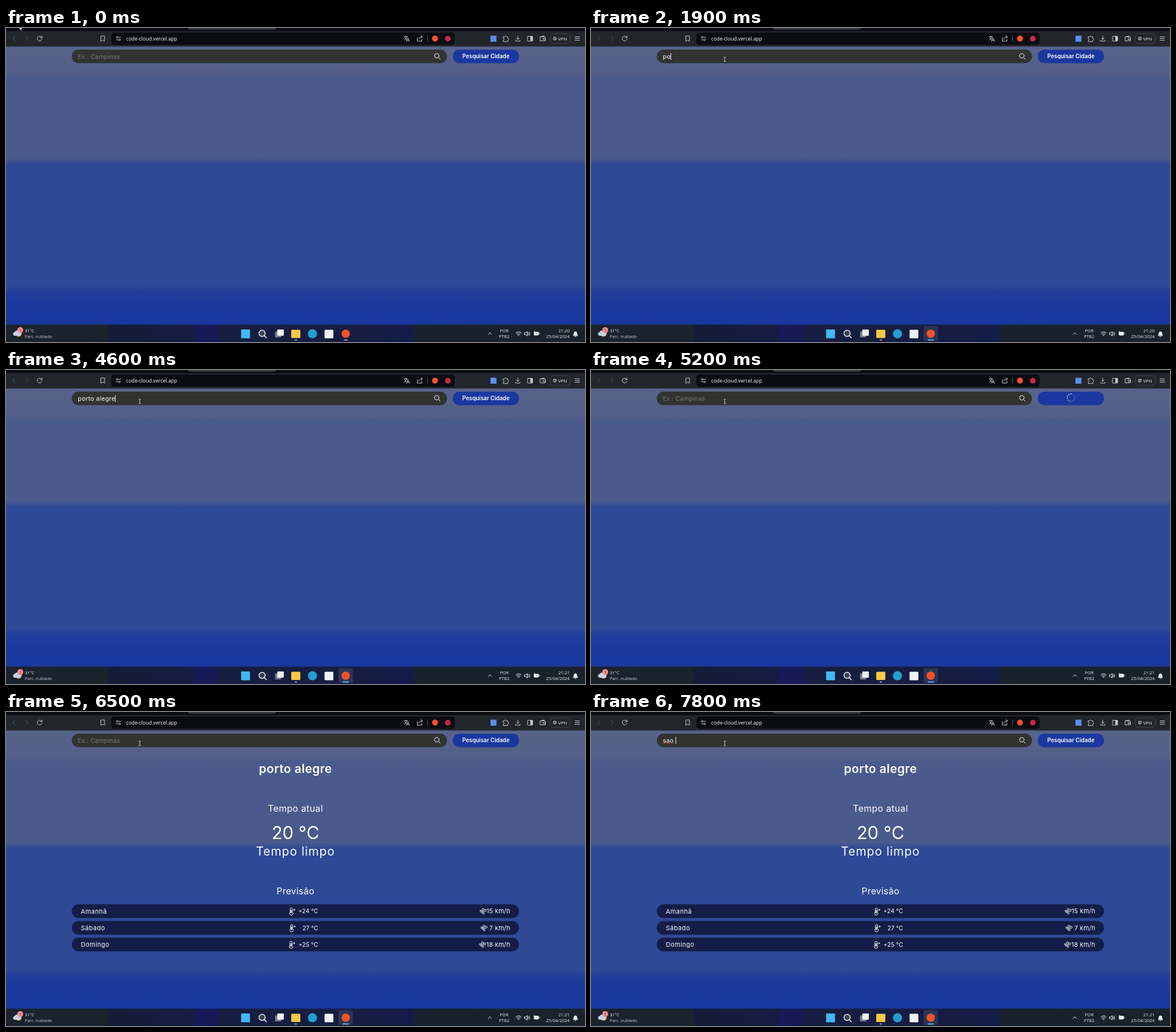
Animation, 1017 px wide and 551 px high, one loop 8000 ms. Source, as an HTML page:

```html
<!DOCTYPE html>
<html lang="pt-BR">
<head>
<meta charset="utf-8">
<title>Previsão do tempo</title>
<style>
html, body { margin: 0; width: 100%; height: 100%; overflow: hidden; background: #1a389f; }
svg { display: block; width: 100vw; height: 100vh; }
text { white-space: pre; font-family: Inter, sans-serif; fill: #fff; }
.ui text { font-family: "Open Sans", "Noto Sans", sans-serif; font-size: 7.6px; fill: #eceef0; }
.mid { text-anchor: middle; }
.end { text-anchor: end; }
.line { fill: none; stroke: #c9ccd1; stroke-width: 1; stroke-linecap: round; stroke-linejoin: round; }
.dim { stroke: #565a61; }
.field { font-size: 10.7px; letter-spacing: .34px; }
#hint { fill: #777872; letter-spacing: .2px; }
.row text { font-size: 11px; }
</style>
</head>
<body>
<svg viewBox="0 0 1017 551" preserveAspectRatio="none">
  <defs>
    <linearGradient id="sky" gradientUnits="userSpaceOnUse" x1="0" y1="32" x2="0" y2="521">
      <stop offset="0" stop-color="#58638a"/>
      <stop offset=".098" stop-color="#545f89"/>
      <stop offset=".115" stop-color="#4a5a8b"/>
      <stop offset=".402" stop-color="#4a5a8c"/>
      <stop offset=".425" stop-color="#2e4996"/>
      <stop offset=".86" stop-color="#2e4996"/>
      <stop offset=".883" stop-color="#213e9b"/>
      <stop offset=".925" stop-color="#1b399d"/>
      <stop offset="1" stop-color="#19389f"/>
    </linearGradient>
    <linearGradient id="bar" gradientUnits="userSpaceOnUse" x1="0" y1="0" x2="1017" y2="0">
      <stop offset="0" stop-color="#1b232d"/>
      <stop offset=".175" stop-color="#1a222d"/>
      <stop offset=".179" stop-color="#141c37"/>
      <stop offset=".322" stop-color="#151c44"/>
      <stop offset=".327" stop-color="#151a58"/>
      <stop offset=".363" stop-color="#151a56"/>
      <stop offset=".369" stop-color="#151d40"/>
      <stop offset=".6" stop-color="#151d42"/>
      <stop offset=".7" stop-color="#131c48"/>
      <stop offset=".71" stop-color="#18212c"/>
      <stop offset="1" stop-color="#1a222b"/>
    </linearGradient>
    <g id="thermo" class="line" style="stroke:#fff">
      <path d="M-2.3 1.6v-5.4a1.9 1.9 0 0 1 3.8 0v5.4a3 3 0 1 1-3.8 0z"/>
      <path d="M-.4-1.5v5" stroke-width="1.6"/>
      <circle cx="4.8" cy="-2.4" r="1.1"/>
    </g>
    <g id="wind" class="line" style="stroke:#fff" stroke-width="1.2">
      <path d="M-5.5-1.3h5.3a1.7 1.7 0 1 0-1.7-1.7M-5.5.6h9.3a1.8 1.8 0 1 0-1.8-1.8M-3.5 2.4h4a1.4 1.4 0 1 1-1.4 1.4"/>
    </g>
  </defs>

  <rect y="32" width="1017" height="490" fill="url(#sky)"/>

  <g class="ui">
    <rect width="1017" height="32.5" fill="#22262b"/>
    <rect width="1017" height="5.5" fill="#0c0d12"/>
    <rect x="319.500" y="-6" width="155" height="9" rx="4" fill="#363940"/>
    <rect x="185" y="8" width="603" height="21.500" rx="5" fill="#0b0c11"/>
    <path class="line dim" d="M16 14.500l-4 4 4 4M35 14.500l4 4-4 4"/>
    <path class="line" d="M62.800 16.500a4.200 4.200 0 1 0 .4 3M63.300 14v3h-3"/>
    <path class="line" d="M167 14h6v9.300l-3-2.300-3 2.300z"/>
    <g class="line">
      <circle cx="195.300" cy="16.300" r="1.500"/><path d="M198.300 16.300h3"/>
      <circle cx="199.300" cy="20.800" r="1.500"/><path d="M193.500 20.800h3"/>
    </g>
    <text x="211" y="21.800" style="font-size:8.800px;fill:#fff">code-cloud.vercel.app</text>
    <path class="line" d="M699.500 15.500h6M702.500 14v1.500M704.500 15.500q-1 4-5 5.800M700.500 17q1.500 3 4 4M703.500 23.500l2.600-6 2.600 6M704.400 21.700h3.400"/>
    <path class="line" d="M722.500 17v6h8v-3M725 20q.3-4.500 6-4.500M729 13l2.600 2.500-2.600 2.500"/>
    <path d="M740.500 13v11" stroke="#4b4e56"/>
    <circle cx="753.500" cy="18.500" r="5.200" fill="#f4512c"/>
    <circle cx="776" cy="18.800" r="5" fill="#c5284f"/>
    <rect x="851" y="13.500" width="10.500" height="10.500" fill="#5b8def"/>
    <path class="line" d="M873.500 15.500h2.500a1.500 1.500 0 1 1 3 0h2.500v2.500a1.500 1.500 0 1 1 0 3v2.800h-8v-2.800a1.500 1.500 0 1 0 0-3z"/>
    <path class="line" d="M899 14v6M896.500 17.800l2.500 2.500 2.500-2.500M895 21.500v1.500h8v-1.500"/>
    <rect class="line" x="916" y="14.500" width="9" height="8.500" rx="1"/>
    <rect x="921" y="15" width="4" height="7.500" fill="#c9ccd1"/>
    <path class="line" d="M938.500 15.500h8a1 1 0 0 1 1 1v6h-9zM938.500 15.500l7-1.500M944 18h3.500v2.500h-3.500z"/>
    <rect x="956" y="10" width="35" height="17" rx="5" fill="none" stroke="#464a51"/>
    <circle cx="964" cy="18.500" r="3.200" fill="#8d929b"/><path d="M962.500 18.500h3" stroke="#2b2e34"/>
    <text x="970" y="21.500" style="font-size:8px">VPN</text>
    <path class="line" d="M999.500 15.500h8M999.500 18.500h8M999.500 21.500h8"/>
  </g>

  <rect x="115.500" y="38" width="659" height="23.700" rx="11.800" fill="#323331"/>
  <text id="hint" class="field" x="126" y="53.500">Ex.: Campinas</text>
  <text id="typed" class="field" x="126.300" y="53.500"></text>
  <path id="typo" d="M126 55.300h19" stroke="#d8453c" stroke-width=".9" stroke-dasharray="1.200 .6"/>
  <rect id="caret" y="44" width="1" height="12" fill="#fff"/>
  <g class="line" style="stroke:#fff" stroke-width="1.400"><circle cx="756.700" cy="48.700" r="4"/><path d="M759.700 51.700l3 3"/></g>
  <rect x="785" y="38" width="116" height="23.700" rx="10.500" fill="#1a389f"/>
  <text id="label" class="mid" x="843" y="53.300" style="font-size:9.800px;font-weight:600">Pesquisar Cidade</text>
  <g id="spinner" fill="#d9e0d8"></g>

  <g id="report">
    <text class="mid" x="508.500" y="106.500" style="font-size:21px;font-weight:600;letter-spacing:.43px">porto alegre</text>
    <text class="mid" x="508.500" y="175" style="font-size:15.800px;letter-spacing:.48px">Tempo atual</text>
    <text class="mid" x="508.500" y="223" style="font-size:31px">20 °C</text>
    <text class="mid" x="508.500" y="251.700" style="font-size:21px;letter-spacing:1px">Tempo limpo</text>
    <text class="mid" x="508.500" y="320" style="font-size:15.800px;letter-spacing:.28px">Previsão</text>
  </g>

  <g class="ui">
    <rect y="520.500" width="1017" height="31" fill="url(#bar)"/>
    <circle cx="22" cy="536" r="5.500" fill="#f2b457"/>
    <path d="M15 540a3.300 3.300 0 0 1 .3-6.500 4.500 4.500 0 0 1 8.500 1 2.800 2.800 0 0 1 .7 5.500z" fill="#c3d3ea"/>
    <circle cx="25" cy="530" r="5.200" fill="#f58e93"/>
    <text class="mid" x="25" y="532.600" style="font-size:7px;fill:#2a1a1e">1</text>
    <text x="33" y="533.600">31°C</text>
    <text x="33" y="544" style="font-size:7.500px;fill:#c9cdd2">Parc. nublado</text>

    <rect id="active" x="584" y="523" width="25.500" height="26" rx="3" fill="#fff" fill-opacity=".1"/>
    <rect x="413" y="529" width="15.500" height="15.500" fill="#43b8f2"/>
    <circle cx="449.800" cy="535.800" r="5.400" fill="#39414f" stroke="#eef0f3" stroke-width="1.500"/>
    <path d="M453.800 540l3.500 3.500" stroke="#eef0f3" stroke-width="1.700" stroke-linecap="round"/>
    <rect x="472.500" y="532.500" width="11" height="10.500" rx="1" fill="#767b86"/>
    <rect x="476.500" y="529" width="11.500" height="11" rx="1" fill="#eceef1"/>
    <rect x="501" y="529.500" width="16" height="14.500" rx="1.500" fill="#f9c846"/>
    <circle cx="538.300" cy="536.600" r="8" fill="#239fcf"/>
    <rect x="559.500" y="529.500" width="15.500" height="15" rx="1.500" fill="#eef2f6"/>
    <circle cx="596.700" cy="536.500" r="7.300" fill="#f4512c"/>
    <rect x="506.800" y="546.500" width="4.500" height="2" rx="1" fill="#9ca1a8"/>
    <rect id="mark" y="546.500" height="2" rx="1"/>

    <path class="line" d="M846.800 537.800l3-3 3 3" style="stroke:#eceef0"/>
    <text class="mid" x="875" y="533.600">POR</text>
    <text class="mid" x="875" y="544">PTB2</text>
    <g class="line" style="stroke:#eceef0">
      <path d="M895.500 535a6.500 6.500 0 0 1 9.500 0M897 537a4.500 4.500 0 0 1 6.500 0M898.600 538.800a2.500 2.500 0 0 1 3.300 0M900.200 540.300v.1"/>
      <path d="M911 535h1.800l2.700-2.500v8l-2.700-2.500h-1.800zM917.300 534.800q1.300 1.700 0 3.400M919 533.300q2.300 3.200 0 6.400"/>
      <rect x="927.500" y="533.500" width="8" height="5.500" rx="1" fill="#eceef0"/><path d="M937.300 535.500v1.500M928 532v3"/>
      <path d="M996.500 539.500q1.200-1.500 1.200-4a2.500 2.500 0 0 1 5 0q0 2.500 1.200 4zM999 541.300h2.300" fill="#eceef0"/>
    </g>
    <text id="clock" class="end" x="990" y="533.600" style="font-size:7.800px"></text>
    <text class="end" x="990" y="544" style="font-size:7.800px">25/04/2024</text>
  </g>

  <path id="arrow" d="M0 0v7.200l1.700-1.500 1.100 2.500 1.200-.5-1.100-2.500h2.300z" fill="#fff" stroke="#111" stroke-width=".4"/>
  <path id="beam" d="M-1.800-3.800h1.300l.5.500.5-.5h1.300M0-3.300v6.900M-1.800 4h1.300l.5-.5.5.5h1.300" fill="none" stroke="#e4e5e2" stroke-width=".9"/>
</svg>
<script>
const LOOP = 8000, NS = 'http://www.w3.org/2000/svg';
const $ = id => document.getElementById(id);
const show = (id, on) => $(id).style.visibility = on ? 'visible' : 'hidden';
const ramp = (t, a, b) => Math.min(1, Math.max(0, (t - a) / (b - a)));
const last = (list, t) => list.filter(k => k[0] <= t).pop();

function add(parent, tag, attrs, text) {
  const el = parent.appendChild(document.createElementNS(NS, tag));
  for (const k in attrs) el.setAttribute(k, attrs[k]);
  if (text) el.textContent = text;
  return el;
}

// Forecast rows: day, temperature, wind, wind icon x, thermometer x
[['Amanhã', '+24 °C', '15 km/h', 838, 501.5],
 ['Sábado', '27 °C', '7 km/h', 839.5, 502],
 ['Domingo', '+25 °C', '18 km/h', 837, 501]].forEach(([day, temp, wind, wx, tx], i) => {
  const y = 337.5 + i * 29.3, mid = y + 12;
  const g = add($('report'), 'g', { class: 'row' });
  add(g, 'rect', { x: 115.5, y, width: 785.5, height: 24, rx: 12, fill: '#131d47' });
  add(g, 'text', { x: 131.5, y: mid + 4, style: 'letter-spacing:.5px' }, day);
  add(g, 'use', { href: '#thermo', x: tx, y: mid });
  add(g, 'text', { class: 'end', x: 548, y: mid + 3.7, style: 'font-size:10.4px' }, temp);
  add(g, 'use', { href: '#wind', x: wx, y: mid });
  add(g, 'text', { class: 'end', x: 885.7, y: mid + 3.7, style: 'letter-spacing:.2px' }, wind);
});

const DOTS = 11;
const dots = Array.from({ length: DOTS }, (_, i) => {
  const a = i / DOTS * 2 * Math.PI;
  return add($('spinner'), 'circle', { cx: 843 + 6.5 * Math.sin(a), cy: 48.5 - 6.5 * Math.cos(a), r: 1.1 });
});

// Key press times for each word
const words = [
  ['porto alegre', [1600, 1900, 2200, 2600, 2700, 2900, 3100, 3600, 3800, 4200, 4400, 4600], 5000],
  ['sao ', [7100, 7300, 7500, 7800], LOOP]
];
const pointer = [[0, 24, -3.5], [100, 62, 9], [200, 138, 34], [300, 208, 57],
  [400, 235, 63], [600, 236, 57], [700, 235, 55]];

// The second word's space has its own key press
const typedAt = t => words.map(([word, keys, end]) =>
  t < end ? word.slice(0, keys.filter(k => k <= t).length) : '').join('');

words[0][1].splice(5, 1, 2900);

function draw(t) {
  t = Math.floor(t / 100) * 100;
  const text = typedAt(t);
  if ($('typed').textContent !== text) $('typed').textContent = text;
  show('hint', !text);
  show('typo', t >= 7800);
  show('caret', t >= 1000 && t < 5000 || t >= 5600 && t < 6500 || t >= 7100);
  $('caret').setAttribute('x', 126 + (text ? $('typed').getComputedTextLength() : 0));

  const busy = t >= 5000 && t < 5300;
  show('label', !busy);
  show('spinner', busy);
  const head = (t - 5000) / 100 + DOTS - 2;
  dots.forEach((d, i) => d.setAttribute('opacity', 1 - .08 * ((head - i + 2 * DOTS) % DOTS)));
  show('report', t >= 5300);

  const focus = ramp(t, 900, 1400);
  const w = t < 1000 ? 7 - 2.5 * ramp(t, 0, 400) : 4.5 + 6.5 * focus;
  $('active').setAttribute('opacity', focus);
  $('mark').setAttribute('x', 596.7 - w / 2);
  $('mark').setAttribute('width', w);
  $('mark').setAttribute('fill', t < 1000 ? '#9ca1a8' : '#5cb9f0');
  $('clock').textContent = t < 3100 ? '21:20' : '21:21';

  const [, x, y] = last(pointer, t);
  const inField = t >= 600;
  show('arrow', !inField);
  show('beam', inField);
  $(inField ? 'beam' : 'arrow').setAttribute('transform', `translate(${x} ${y})`);
}

let start;
function tick(now) {
  start ??= now;
  draw((now - start) % LOOP);
  requestAnimationFrame(tick);
}
draw(0);
requestAnimationFrame(tick);
</script>
</body>
</html>
```
